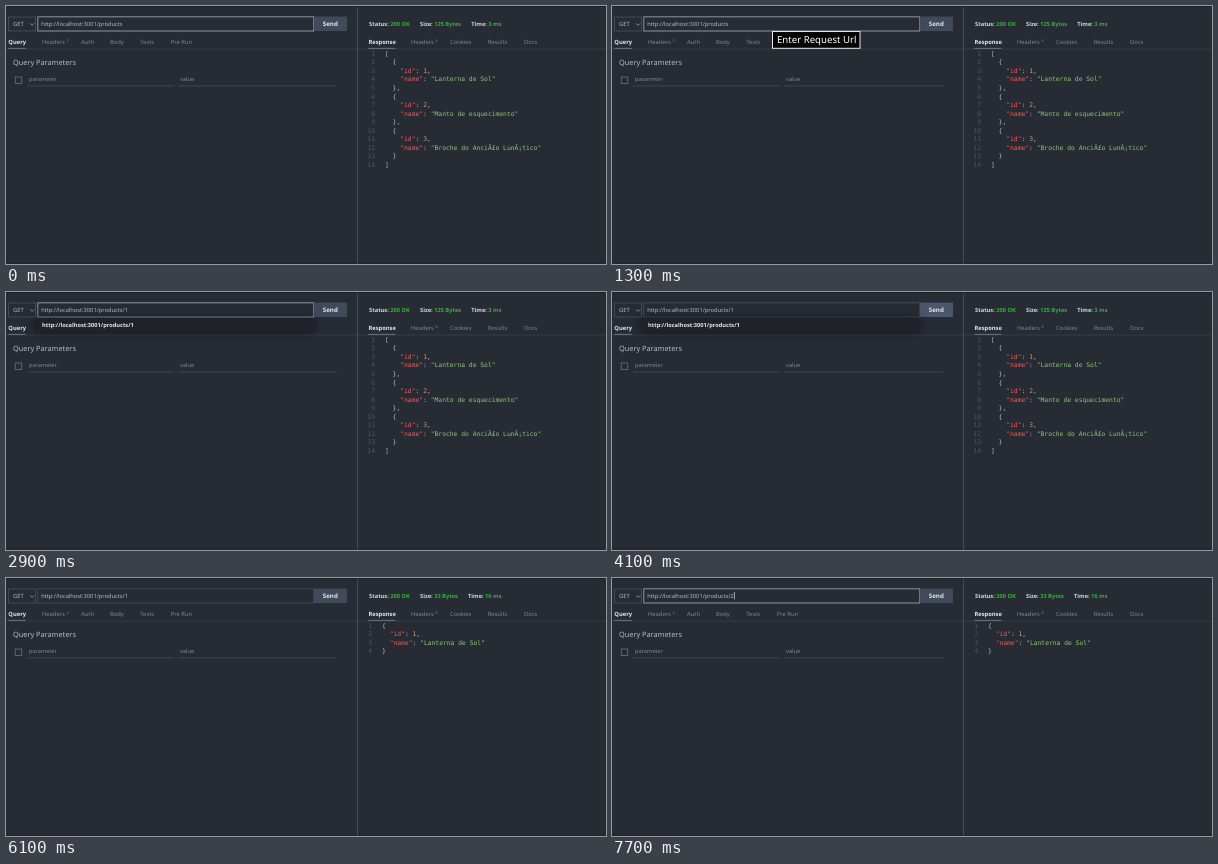
Animation, 600 px wide and 258 px high, one loop 8 s. Source, as an HTML page:

```html
<!DOCTYPE html>
<html lang="en">
<head>
<meta charset="utf-8">
<title>API request</title>
<style>
  html, body { margin: 0; width: 100%; height: 100%; overflow: hidden; background: #272b33; }
  svg { display: block; width: 600px; height: 258px; }
  text { font-family: "Noto Sans", "Open Sans", sans-serif; white-space: pre; text-rendering: geometricPrecision; }
  #menu { filter: drop-shadow(0 0 4px rgba(0, 0, 0, .5)); }
  .mono text { font-family: "DejaVu Sans Mono", monospace; font-size: 6.33px; }
</style>
</head>
<body>
<svg id="stage" viewBox="0 0 600 258"></svg>
<script>
const LOOP = 8000;
const BASE = "http://localhost:3001/products";
const C = {
  line: "#434954", dim: "#7f8692", text: "#b4bac5", white: "#e4e7ec", green: "#35b03f",
  key: "#e5605e", string: "#8cc878", number: "#d19a66", gutter: "#4d5462",
  button: "#414a5b", hover: "#4b566a", focus: "#8d939d"
};
const stage = document.getElementById("stage");

function el(tag, attrs, parent = stage) {
  const node = document.createElementNS("http://www.w3.org/2000/svg", tag);
  for (const k in attrs) node.setAttribute(k, attrs[k]);
  parent.append(node);
  return node;
}
const group = (attrs = {}) => el("g", attrs);
const rect = (x, y, width, height, fill, parent, more) =>
  el("rect", { x, y, width, height, fill, ...more }, parent);
const box = (x, y, w, h, stroke, fill = "none", parent) =>
  rect(x, y, w, h, fill, parent, { stroke, "stroke-width": 1 });
function label(str, x, y, size, fill, parent, more) {
  const node = el("text", { x, y, fill, "font-size": size, ...more }, parent);
  node.textContent = str;
  return node;
}
function span(str, fill, parent, more) {
  const node = el("tspan", { fill, ...more }, parent);
  node.textContent = str;
}
const show = (node, on) => node.setAttribute("visibility", on ? "visible" : "hidden");

// Frame of the window
rect(0, 0, 600, 258, "#272b33");
rect(0, 0, 600, 1, "#1d2026");
rect(0, 257, 600, 1, "#21242b");
rect(0, 42.6, 600, .9, "#383d47");
rect(351, 1, 1, 257, "#444a55");

// Request bar
box(2.5, 11, 27, 14, C.line);
label("GET", 7, 20.3, 5.8, C.text);
el("path", { d: "M24.2 17.4l2 2 2-2", fill: "none", stroke: C.text, "stroke-width": .7 });
const field = box(31.8, 10.8, 276, 14.2, C.line);
const url = label("", 35.2, 19.8, 5.7, C.text);
const caret = rect(0, 14, .6, 7.4, C.white);
const send = rect(308, 10.5, 33, 14.5, C.button);
label("Send", 324.3, 20.2, 6.2, C.white, stage, { "text-anchor": "middle", "font-weight": 700 });

// Tabs
function tabs(items, width) {
  items.forEach(([name, x, count], i) => {
    const first = i === 0;
    label(name, x, 38.4, 5.8, first ? C.white : C.dim, stage, { "font-weight": first ? 600 : 400 });
    if (count) label(count, x + 24.6, 36.3, 3.9, C.dim);
  });
  rect(items[0][1], 41.9, width, .8, "#7d838e");
}
tabs([["Query", 2.3], ["Headers", 36, 2], ["Auth", 75], ["Body", 104], ["Tests", 134.3], ["Pre Run", 164.8]], 17.5);
tabs([["Response", 362.4], ["Headers", 405, 6], ["Cookies", 444], ["Results", 481.7], ["Docs", 518]], 27);

// Query parameters
label("Query Parameters", 7, 59, 7.33, C.text);
box(9.3, 71, 6.4, 6.5, "#5d646f");
label("parameter", 23, 75.4, 5.6, C.dim);
label("value", 174, 75.4, 5.7, C.dim);
rect(21, 79.5, 147, .8, "#444a54");
rect(172, 79.5, 159, .8, "#444a54");

// Response panes
function response(size, time, lines, shift) {
  const pane = group();
  const head = label("", 363.1, 20.1, 5.7, C.white, pane, { "font-weight": 700 });
  [["Status:", "200 OK"], ["Size:", size], ["Time:", time]].forEach(([name, value], i) => {
    span(name + " ", "#d3d7de", head, { dx: i ? 10.2 : 0 });
    span(value, C.green, head);
  });
  const code = el("g", { class: "mono" }, pane);
  lines.forEach((line, i) => {
    const y = 49.8 + i * 8.54;
    label(i + 1, 366 + shift, y, 6.33, C.gutter, code, { "text-anchor": "end" });
    const row = label("", 376 + shift, y, 6.33, C.text, code);
    for (const part of line.match(/"[^"]*"(?=:)|"[^"]*"|\d+|[^"\d]+/g)) {
      const isKey = part[0] === '"' && line.includes(part + ":");
      const fill = isKey ? C.key : part[0] === '"' ? C.string : /\d/.test(part) ? C.number : C.text;
      span(part, fill, row);
    }
  });
  return pane;
}
const products = ["Lanterna de Sol", "Manto de esquecimento", "Broche do AnciÃ£o LunÃ¡tico"]
  .map((name, i) => ({ id: i + 1, name }));
const json = data => JSON.stringify(data, null, 2).split("\n");
const listPane = response("125 Bytes", "3 ms", json(products), 3);
const itemPane = response("33 Bytes", "16 ms", json(products[0]), 0);

// Suggestions and tooltip
const menu = group({ id: "menu" });
const menuBack = rect(29, 26.3, 279, 14, "#1f2329", menu);
const rows = [0, 1, 2].map(i =>
  label("", 36, 35.2 + i * 13, 5.67, C.white, menu, { "font-weight": 700 }));
const tip = group();
box(160.5, 25.5, 87.5, 16.8, "#e8e8e8", "#050506", tip);
label("Enter Request Url", 165, 37.2, 9.65, "#fff", tip);

// Each step changes only what it names
const steps = [
  [0, { path: "", focus: true, caret: false, hover: false, tip: false, menu: [], done: false }],
  [500, { caret: true }],
  [1000, { caret: false }],
  [1300, { tip: true }],
  [1600, { tip: false }],
  [1700, { menu: ["", "/1", "/3"] }],
  [1900, { path: "/", caret: true, menu: ["/1", "/3"] }],
  [2300, { path: "/1", menu: ["/1"] }],
  [2900, { caret: false }],
  [3300, { caret: true }],
  [3500, { hover: true }],
  [3700, { caret: false }],
  [4000, { focus: false }],
  [4200, { menu: [] }],
  [4300, { done: true }],
  [6100, { hover: false }],
  [6500, { focus: true, caret: true }],
  [7100, { caret: false }],
  [7500, { path: "/", caret: true, menu: ["/1", "/3"] }],
  [7700, { path: "/2", menu: [] }]
];

function render(t) {
  const s = Object.assign({}, ...steps.filter(([at]) => at <= t).map(([, change]) => change));
  url.textContent = BASE + s.path;
  caret.setAttribute("x", 35.5 + url.getComputedTextLength());
  show(caret, s.caret);
  field.setAttribute("stroke", s.focus ? C.focus : C.line);
  send.setAttribute("fill", s.hover ? C.hover : C.button);
  show(tip, s.tip);
  show(menu, s.menu.length > 0);
  menuBack.setAttribute("height", 1 + 13 * s.menu.length);
  rows.forEach((row, i) => { row.textContent = i < s.menu.length ? BASE + s.menu[i] : ""; });
  show(listPane, !s.done);
  show(itemPane, s.done);
}

const start = performance.now();
function tick() {
  render((performance.now() - start) % LOOP);
  requestAnimationFrame(tick);
}
tick();
</script>
</body>
</html>
```
